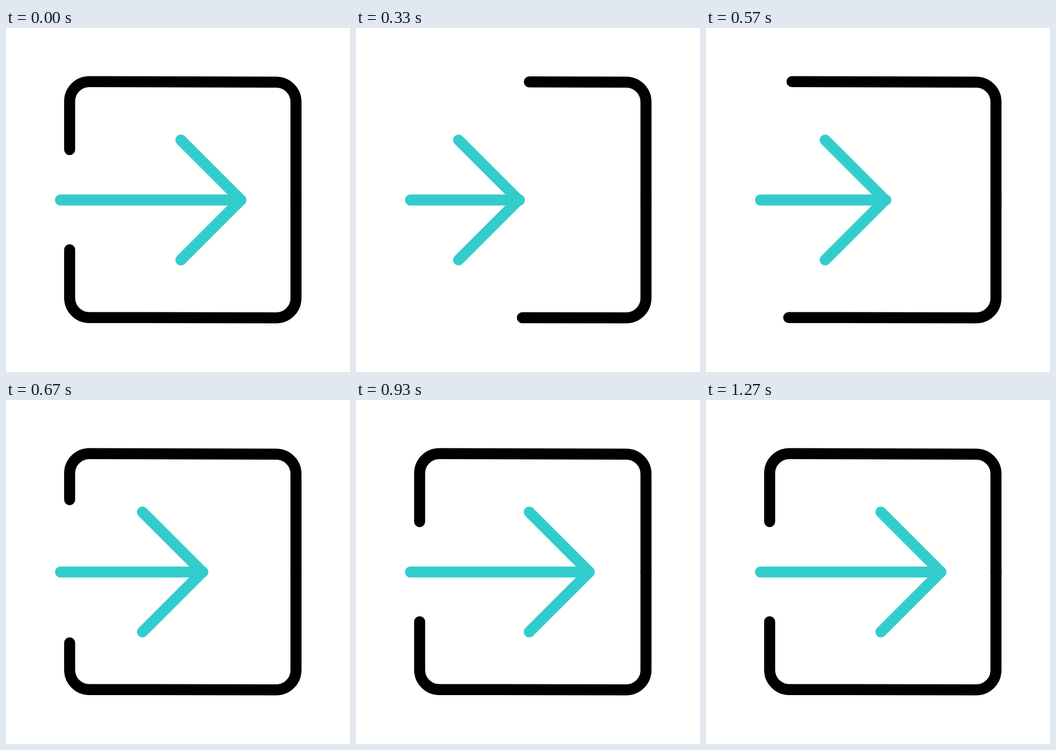
An HTML page that plays this animation: 640x640 px, repeating every 2 s.

```html
<!DOCTYPE html>
<html lang="en">
<head>
<meta charset="utf-8">
<title>Enter icon</title>
<style>
  html, body { margin: 0; height: 100%; overflow: hidden; background: #fff; }
  svg { display: block; width: 100vw; height: 100vh; }
  path {
    fill: none;
    stroke-width: 20.5;
    stroke-linecap: round;
    stroke-linejoin: round;
    animation: 2s cubic-bezier(.333, 0, .667, 1) infinite paused;
    animation-delay: calc(var(--step, 0) * -1s / 30);
  }
  .side { stroke: #000; stroke-dasharray: 735.4 1000; animation-name: trim; }
  .top { --cut: 322.4px; }
  .bottom { --cut: 308.9px; }
  .shaft, .head { stroke: #33cccc; }
  .shaft { stroke-dasharray: 335.7 500; animation-name: shorten; }
  .head { animation-name: push; }

  @keyframes trim {
    0%, 37.633%, 100% { stroke-dashoffset: 0px; }
    18.333% { stroke-dashoffset: var(--cut); }
  }
  @keyframes shorten {
    0%, 63.333%, 100% { stroke-dashoffset: 0px; }
    20% { stroke-dashoffset: 143.5px; animation-timing-function: cubic-bezier(.17, .03, .83, .89); }
    45% { stroke-dashoffset: 0px; }
    54.167% { stroke-dashoffset: 36px; }
  }
  @keyframes push {
    0%, 63.333%, 100% { transform: translateX(0); }
    20% { transform: translateX(-145.4px); animation-timing-function: cubic-bezier(.17, .03, .83, .89); }
    45% { transform: translateX(0); }
    54.167% { transform: translateX(-36px); }
  }
</style>
</head>
<body>
<svg viewBox="0 0 640 640">
  <path class="side top" pathLength="735.4"
    d="M539.5 320V137.4A36.7 36.7 0 0 0 502.8 100.7L154.8 99.8A36.5 36.5 0 0 0 118.4 136.3V226.3"/>
  <path class="side bottom" pathLength="735.4"
    d="M539.5 320V502.6A36.7 36.7 0 0 1 502.8 539.3L154.8 538.7A36.5 36.5 0 0 1 118.4 502.2V412.5"/>
  <path class="shaft" d="M101.3 320H437"/>
  <path class="head" d="M325.4 208.4L437 320L325.4 431.6"/>
</svg>
<script>
  // Advance the paused keyframes at 30 steps per second.
  const root = document.documentElement;
  const start = performance.now();
  function tick() {
    const ms = (performance.now() - start) % 2000;
    root.style.setProperty('--step', Math.floor((ms + 4) * 30 / 1000) % 60);
    requestAnimationFrame(tick);
  }
  tick();
</script>
</body>
</html>
```
